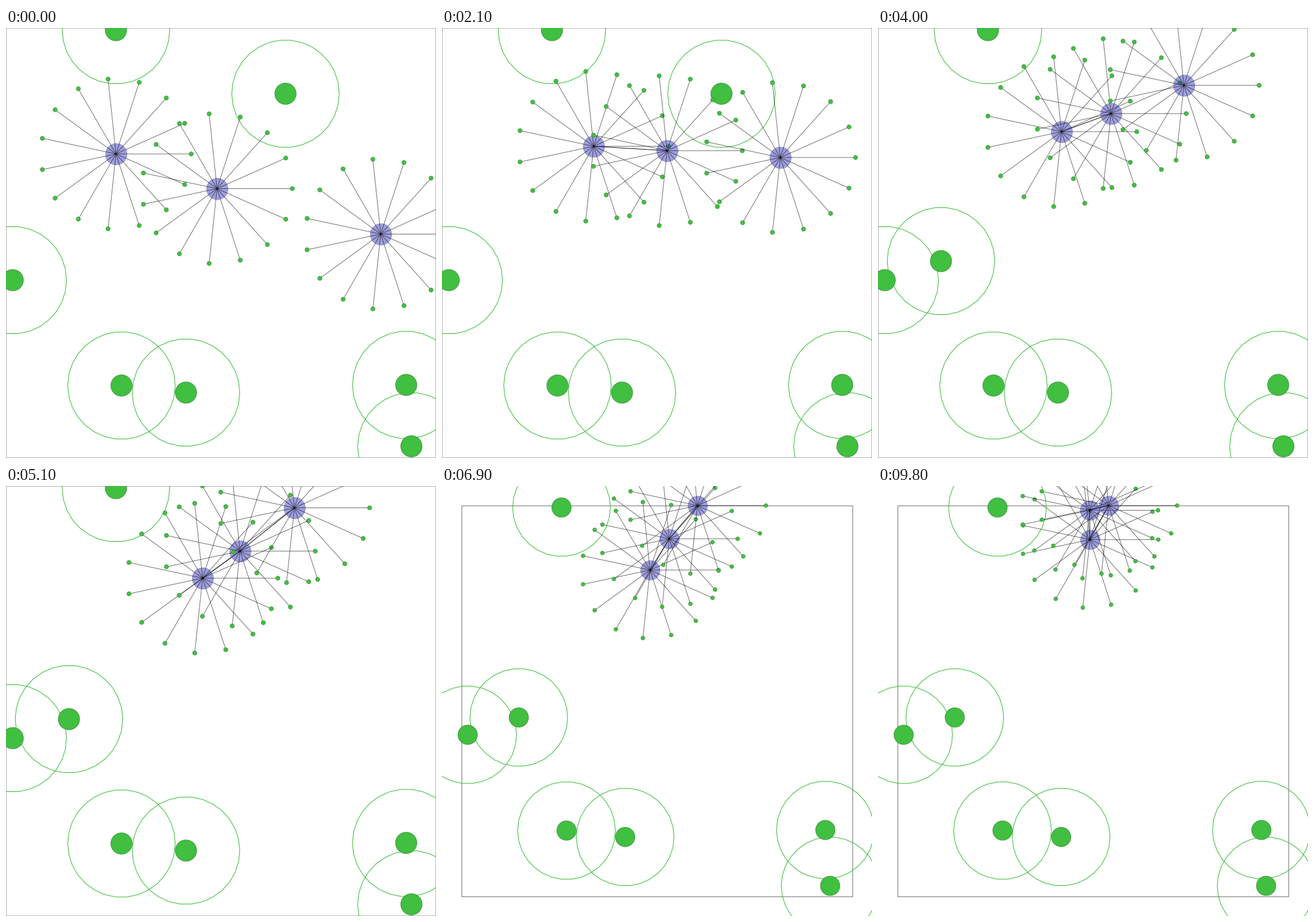
A matplotlib script that plays this animation: 700x700 px, repeating every 9.9 s.

```python
import numpy as np
import matplotlib.pyplot as plt
from matplotlib.animation import FuncAnimation
from matplotlib.collections import LineCollection, PolyCollection

SIZE, DPI = 700, 100
FRAMES, INTERVAL = 99, 100
PX = 72 / DPI
MID = SIZE / 2

BODY_R, COVER_R, TIP_R, RANGE = 17.5, 87.5, 3.5, 122.5
GREEN = (0.25, 0.75, 0.25)
GREEN_EDGE = (0.125, 0.375, 0.125, 0.5)
RING = (0.2, 0.74, 0.2)
BLUE = (0.25, 0.25, 0.75, 0.5)
BLUE_EDGE = (0.125, 0.125, 0.375, 0.25)

# Each agent passes its five points at these shared times
KEY_FRAMES = np.array([0, 29, 51, 69, 98])
PATHS = [
    [(179, 205), (271.5, 184.5), (320, 150), (337.5, 115.5), (344.5, 61)],
    [(343.5, 261.5), (373.5, 174), (381, 106), (372, 59.5), (344, 8.5)],
    [(610, 335.5), (527, 160.5), (469.5, 35.5), (422.5, -16), (378, -16)],
]
START_SPEED = 0.7  # share of the first leg's mean speed

TARGETS = [(179, 3.5), (11, 410.5), (188, 582), (293, 593.5), (651.5, 581), (660, 681)]
FIRST_SPOT, NEXT_SPOT, RESPAWN = (455, 107), (102.5, 379.5), 38


def unit_points(count):
    angle = np.arange(count) * 2 * np.pi / count
    return np.column_stack([np.cos(angle), np.sin(angle)])


RAYS, CIRCLE = unit_points(15), unit_points(30)


def smooth_path(points):
    """Cubic Hermite curve through the points, stopped by the arena walls."""
    t, pos = KEY_FRAMES, np.array(points, float)
    slope = np.gradient(pos, t, axis=0, edge_order=2)
    slope[0] = START_SPEED * (pos[1] - pos[0]) / (t[1] - t[0])
    now = np.arange(FRAMES)
    i = np.clip(np.searchsorted(t, now, side="right") - 1, 0, len(t) - 2)
    h = (t[i + 1] - t[i])[:, None]
    u = (now - t[i])[:, None] / h
    ease = u * u * (3 - 2 * u)
    out = (pos[i] + ease * (pos[i + 1] - pos[i])
           + h * u * (1 - u) * ((1 - u) * slope[i] - u * slope[i + 1]))
    return np.clip(out, 0, SIZE)


tracks = [smooth_path(p) for p in PATHS]


def circles(centers, r):
    return [np.asarray(c) + r * CIRCLE for c in centers]


def ray_tips(origin, targets):
    """Ends of the sensor rays, cut short where they meet a target."""
    dist = np.full(len(RAYS), RANGE)
    for target in targets:
        d = np.subtract(target, origin)
        along = RAYS @ d
        disc = along**2 - d @ d + BODY_R**2
        hit = along - np.sqrt(np.maximum(disc, 0))
        ok = (disc > 0) & (hit > 0)
        dist[ok] = np.minimum(dist[ok], hit[ok])
    return origin + RAYS * dist[:, None]


fig = plt.figure(figsize=(SIZE / DPI, SIZE / DPI), dpi=DPI, facecolor="white")
ax = fig.add_axes([0, 0, 1, 1])
ax.set_xlim(0, SIZE)
ax.set_ylim(SIZE, 0)
ax.axis("off")


def add_lines(z, color):
    lines = LineCollection([], colors=[color], linewidths=PX, zorder=z, snap=False)
    return ax.add_collection(lines, autolim=False)


def add_polys(z, face, edge, width=1.0):
    polys = PolyCollection([], facecolors=[face], edgecolors=[edge],
                           linewidths=width * PX, zorder=z, snap=False)
    return ax.add_collection(polys, autolim=False)


border = add_polys(1, "none", (0, 0, 0, 0.55))
links = add_lines(2, (0, 0, 0, 0.9))
rings = add_polys(3, "none", RING)
spots = add_polys(4, GREEN, GREEN_EDGE)
agents = [(add_polys(z, BLUE, BLUE_EDGE),
           add_lines(z + 1, (0, 0, 0, 0.55)),
           add_polys(z + 2, GREEN, GREEN_EDGE, 0.8)) for z in (5, 8, 11)]
WALLS = np.array([(0, 0), (1, 0), (1, 1), (0, 1)]) * SIZE


def update(n):
    here = [track[n] for track in tracks]
    targets = TARGETS + [FIRST_SPOT if n < RESPAWN else NEXT_SPOT]

    # The camera backs off to keep every agent in view
    reach = np.abs(np.array(here) - MID).max() / MID
    zoom = max(1, reach + 2 * BODY_R / MID)

    def view(shapes):
        return [MID + (np.asarray(s) - MID) / zoom for s in shapes]

    near = [(here[a], here[b]) for a in range(3) for b in range(a + 1, 3)
            if np.hypot(*(here[a] - here[b])) <= RANGE]
    border.set_verts(view([WALLS]))
    links.set_segments(view(near))
    rings.set_verts(view(circles(targets, COVER_R)))
    spots.set_verts(view(circles(targets, BODY_R)))

    for pos, (body, rays, tips) in zip(here, agents):
        ends = ray_tips(pos, targets)
        body.set_verts(view(circles([pos], BODY_R)))
        rays.set_segments(view([(pos, end) for end in ends]))
        tips.set_verts(view(circles(ends, TIP_R)))
    return []


anim = FuncAnimation(fig, update, frames=FRAMES, interval=INTERVAL,
                     repeat=True, repeat_delay=0, init_func=lambda: update(0))
plt.show()
```
